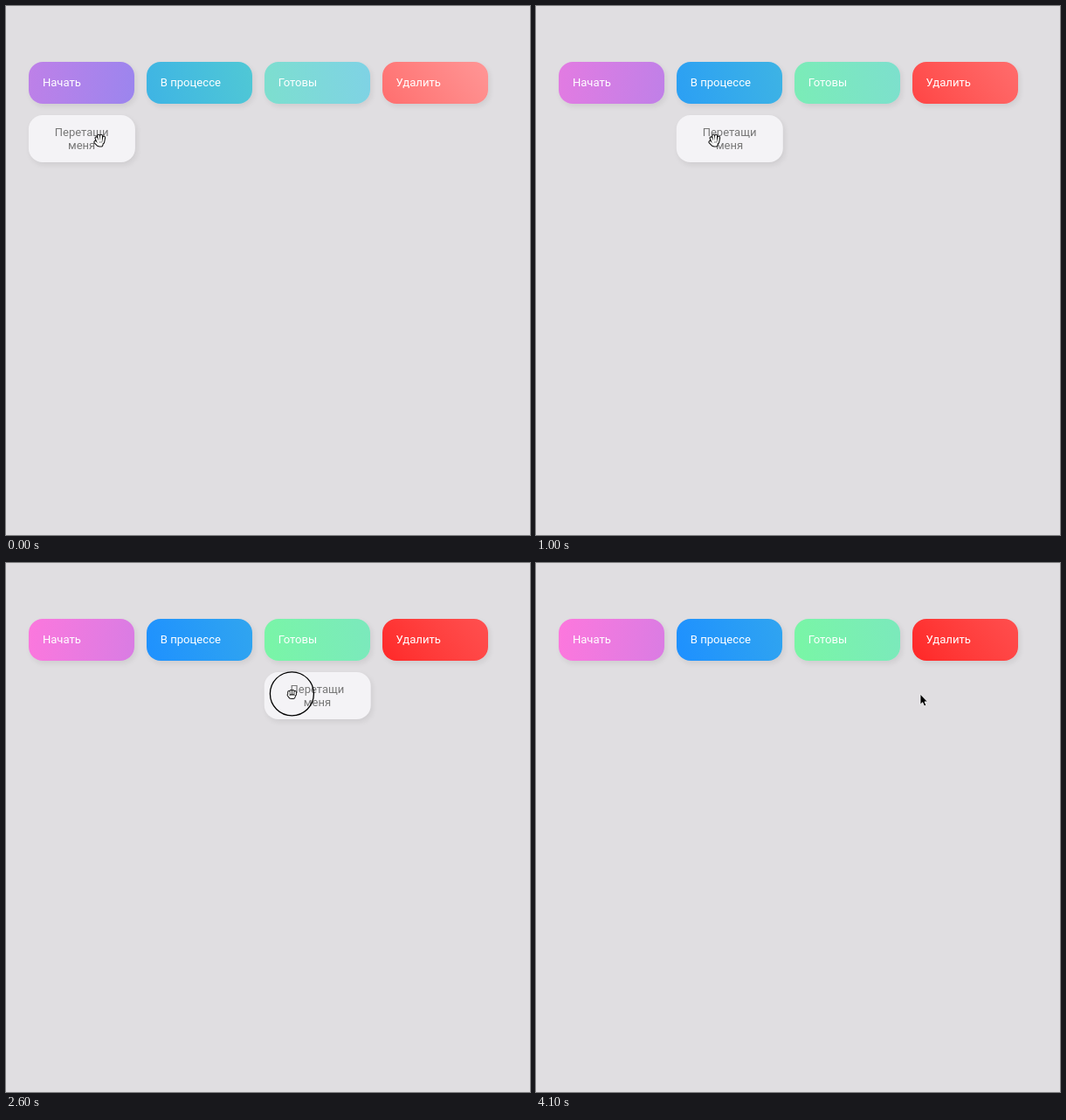
An HTML page that plays this animation: 600 by 606 pixels, repeating every 4.2 s.

```html
<!DOCTYPE html>
<html lang="ru">
<head>
<meta charset="utf-8">
<style>
  html, body { margin: 0; width: 100%; height: 100%; overflow: hidden; background: #e0dee1; }
  body { position: relative; font: 13px/15.5px Roboto, sans-serif; }
  .head, #card, #line, svg { position: absolute; }
  .head, #card { box-sizing: border-box; width: 121.5px; border-radius: 16px; box-shadow: 2px 3px 6px rgba(0,0,0,.08); }
  .head { top: 64px; height: 48px; padding-left: 16px; line-height: 48px; color: #fff; font-size: 13.1px; }
  #card { left: 0; top: 0; height: 53.5px; padding-top: 11.5px; text-align: center; color: #777; background: #f4f3f6; }
  #card.drag { color: #8d8986; background: linear-gradient(100deg, #f6ebe5, #f2ede0); box-shadow: 0 4px 14px rgba(70,70,100,.3); }
  #line { top: 125px; width: 121.5px; height: 1px; background: #444; }
  svg { left: 0; top: 0; }
  .hand { stroke-linecap: round; stroke-linejoin: round; }
</style>
</head>
<body>
<div id="line"></div>
<div id="card">Перетащи<br>меня</div>
<svg width="600" height="606">
  <defs>
    <path id="open" d="M-4-2.6L-2 2M-1.4-5.2L-.5 1M1.5-5.2L1.4 1M4.6-3.2L3.6 2M-5.2 1.8L-2 5M-1.2 3.2H2.4L1.8 5.6H-.6Z"/>
    <path id="fist" d="M-3.4-2V1M-1.1-3V0M1.3-3V0M3.7-2V1M-4 1.4L-2 4M-1.6 2.4H2.8L2 4.4H-.8Z"/>
  </defs>
  <g id="pointer">
    <circle id="ring" fill="none" stroke="#000" stroke-width="1.3"/>
    <g id="openHand" class="hand"><use href="#open" stroke="#111" stroke-width="4"/><use href="#open" stroke="#fff" fill="#fff" stroke-width="1.9"/></g>
    <g id="fistHand" class="hand"><use href="#fist" stroke="#111" stroke-width="3.6"/><use href="#fist" stroke="#fff" fill="#fff" stroke-width="1.6"/></g>
    <path id="arrow" d="M0-1V11L2.7 8.5L4.6 12.8L6.8 11.8L5 7.7H8.4Z" fill="#000" stroke="#fff" stroke-width=".8"/>
    <g id="badge" transform="translate(7.2 16.6)">
      <circle r="7.6" fill="#239a1b" stroke="#d5dcd3" stroke-width=".8"/>
      <path d="M-4 0H4M0-4V4" stroke="#fff" stroke-width="2"/>
    </g>
  </g>
</svg>
<script>
const LOOP = 4200, STEP = 100, GLIDE = 300;
const WIDTH = 121.5, CARD_TOP = 125, SPAN = 2.8;
const $ = id => document.getElementById(id);
const colX = i => 25.9 + 134.9 * i;
const colAt = x => Math.floor((x - colX(0)) / 134.9);
const clamp = k => Math.min(1, Math.max(0, k));
const easeOut = k => 1 - (1 - clamp(k)) ** 1.8;
const mix = (a, b, k) => a.map((v, i) => v + (b[i] - v) * k);

// label, gradient ends, angle
const heads = [
  ['Начать', '#fd77dd', '#9b85ee', 98],
  ['В процессе', '#1e90ff', '#50c8d5', 75],
  ['Готовы', '#79f6a5', '#7fd2e5', 80],
  ['Удалить', '#ff2626', '#ff9696', 50]
].map(([text, from, to, angle], i) => {
  const el = document.createElement('div');
  el.className = 'head';
  el.textContent = text;
  el.style.left = colX(i) + 'px';
  document.body.prepend(el);
  const shade = k => `color-mix(in srgb, ${to} ${k / SPAN * 100}%, ${from})`;
  return shift => el.style.background = `linear-gradient(${angle}deg, ${shade(shift)}, ${shade(shift + 1)})`;
});

// each move carries the card one column to the right
const moves = [
  { press: 100, lift: 200, drop: 600, from: [111, 154], to: [190, 154] },
  { press: 1500, lift: 1500, drop: 1900, from: [212.3, 154], to: [350.7, 154] },
  { press: 2400, lift: 2600, drop: 3300, from: [327.4, 149.8], to: [440, 151.2] }
];

// glide while dragging, drift to the next grab in between
function pointerAt(t) {
  let rest = [107.5, 154], free = 0;
  for (const m of moves) {
    if (t < m.press) return mix(rest, m.from, easeOut((t - free) / (m.press - free)));
    if (t < m.drop) return mix(m.from, m.to, easeOut((t - m.lift) / GLIDE));
    rest = m.to;
    free = m.drop;
  }
  return rest;
}

// the ring grows while the button is held and shrinks after release
function ringRadius(t) {
  const m = moves.findLast(m => t >= m.press);
  if (!m) return 0;
  const grown = Math.min(31.3, 11 + (Math.min(t, m.drop) - m.press) * .07);
  return Math.max(0, grown - Math.max(0, t - m.drop) * .1);
}

const show = (id, on) => $(id).style.display = on ? '' : 'none';

function draw(t) {
  const shift = (SPAN - 1) * clamp(1 - t / 3200) ** 2.3;
  heads.forEach(paint => paint(shift));

  const [x, y] = pointerAt(t);
  const held = moves.find(m => t >= m.press && t < m.drop);
  const drag = held && t > held.lift;
  const home = moves.filter(m => t >= m.drop).length;
  const left = colX(home) + (drag ? x - held.from[0] : 0);
  const top = CARD_TOP + (drag ? y - held.from[1] : 0);
  const present = home < moves.length;
  const onCard = present && x > left && x < left + WIDTH;

  $('card').style.transform = `translate(${left}px, ${top}px)`;
  $('card').className = drag ? 'drag' : '';
  show('card', present);

  // the drop marker follows one step behind
  const target = colAt(pointerAt(t - STEP)[0]);
  $('line').style.left = colX(target) + 'px';
  show('line', drag && target > 0);

  $('pointer').setAttribute('transform', `translate(${x} ${y})`);
  $('ring').setAttribute('r', ringRadius(t));
  show('ring', ringRadius(t) > 0);
  show('openHand', !held && onCard);
  show('fistHand', held && !drag);
  show('arrow', drag || !held && !onCard);
  show('badge', drag && x < colX(colAt(x)) + WIDTH);
}

const start = performance.now();
function tick() {
  const t = (performance.now() - start) % LOOP;
  draw(Math.floor(t / STEP) * STEP);
  requestAnimationFrame(tick);
}
tick();
</script>
</body>
</html>
```
